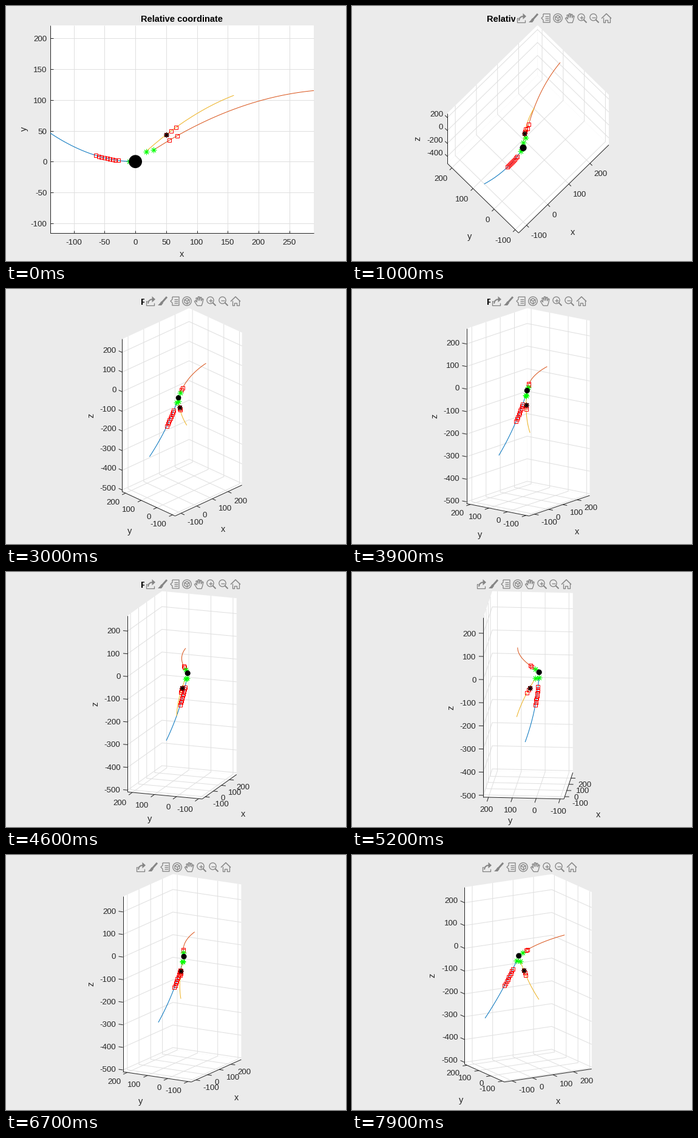
Write a matplotlib script that moves like this. It is 560x420 px and loops after 8 s.

```python
import numpy as np
import matplotlib.pyplot as plt
from matplotlib.animation import FuncAnimation
from matplotlib.patches import Circle, Polygon, Rectangle

W, H, PT = 560, 420, 0.72            # stage size, points per pixel
FRAMES, STEP = 80, 2.5               # degrees turned per frame
BG, INK, GRID, ICON = "#ebebeb", "#262626", "#dfdfdf", "#858585"
LO = np.array([-137.8, -116.0, -508.0])
HI = np.array([289.4, 221.6, 268.0])
MID = (LO + HI) / 2
CENTER = np.array([290.0, 202.7])
AREA = (434.0, 342.3)

plt.rcParams["font.family"] = "Liberation Sans"
fig = plt.figure(figsize=(W / 100, H / 100), dpi=100, facecolor=BG)
ax = fig.add_axes([0, 0, 1, 1])


# ---- flight paths: y and z as functions of x ----
def blue(x):
    return np.array([x, 0.00242 * x**2, 1.93 * x - 0.6 + 0.0001 * x**2])


def orange(x):
    u = x - 29.5
    return np.array([x, 18.7 + 0.6459 * u - 0.001056 * u**2, 4 + 0.0745 * x])


def yellow(x):
    u = x - 17.2
    return np.array([x, 16.3 + 0.8919 * u - 0.00177 * u**2,
                     -30 - 1.612 * u + 0.00111 * u**2])


PATHS = [
    (blue, -10, LO[0], "#0072bd", np.linspace(-64, -28, 9)),
    (orange, 29.5, HI[0], "#d95319", np.array([55.0, 68.0])),
    (yellow, 17.2, 159.5, "#edb120", np.array([50.2, 57.6, 66.4])),
]


# ---- camera ----
def view(k):
    if k < 5:
        return 0.0, 90.0
    if k <= 35:
        return -45.0, 90 - STEP * (k - 5)
    if k <= 54:
        return -45 - STEP * (k - 36), 15.0
    return -90 + STEP * (k - 55), 15.0


class Camera:
    def __init__(self, az, el):
        a, e = np.radians([az, el])
        self.m = np.array([
            [np.cos(a), np.sin(a), 0],
            [-np.sin(e) * np.sin(a), np.sin(e) * np.cos(a), np.cos(e)]])
        span = np.abs(self.m) @ (HI - LO)
        self.s = min(AREA[0] / span[0], AREA[1] / span[1])

    def __call__(self, p):
        q = self.s * (self.m @ (np.asarray(p, float).T - MID).T)
        return CENTER + q * [1, -1]

    def curve(self, pts):
        q = self.s * (self.m @ (pts - MID[:, None]))
        return CENTER[0] + q[0], CENTER[1] - q[1]

    def axis(self, i):
        return self.s * self.m[:, i] * [1, -1]


# ---- drawing helpers ----
def line(*pts, color=INK, lw=1.0, z=2):
    x, y = zip(*pts)
    ax.plot(x, y, color=color, lw=lw * PT, zorder=z, solid_capstyle="butt")


def label(x, y, s, size=13.33, ha="center", z=6, **kw):
    ax.text(x, y, s, fontsize=size * PT, ha=ha, va="center_baseline"
            if kw.get("rotation") is None else "center",
            color=kw.pop("color", INK), zorder=z, **kw)


def ticks(i, step):
    return np.arange(np.ceil(LO[i] / step), HI[i] // step + 1) * step


def at(i, v, base):
    p = np.array(base, float)
    p[i] = v
    return p


# ---- plot frames ----
def flat_axes(cam):
    a, b = cam(LO), cam(HI)
    ax.add_patch(Rectangle(a, *(b - a), color="white", lw=0, zorder=0))
    for v in ticks(0, 50):
        x = cam(at(0, v, LO))[0]
        line((x, a[1]), (x, b[1]), color=GRID, z=1)
        line((x, a[1]), (x, a[1] - 4.3))
        label(x, 388.5, f"{v:.0f}")
    for v in ticks(1, 50):
        y = cam(at(1, v, LO))[1]
        line((a[0], y), (b[0], y), color=GRID, z=1)
        line((a[0], y), (a[0] + 4.3, y))
        label(67.5, y + 0.5, f"{v:.0f}", ha="right")
    line((a[0], b[1]), a, (b[0], a[1]))
    label(290, 407.5, "x", 14.67)
    label(30, 202, "y", 14.67, rotation=90)


def offsets(az, el):
    """Shift of the x, y and z names from the middle of their axes."""
    if el > 15:
        els = [15, 50, 77.5, 90]
        cols = ([25, 22, 15, 12], [41.5, 54, 70, 77],
                [-32, -29, -22, -20], [41, 50, 62, 67], [-53, -48, -49, -49])
        v = [np.interp(el, els, c) for c in cols]
    else:
        azs = [-90, -85, -60, -52.5, -30]
        cols = ([52, 49, 33, 29, 17], [46.5, 46, 43, 42, 41],
                [-20, -22, -27, -29, -38], [35.5, 36, 39, 40, 43])
        v = [np.interp(az, azs, c) for c in cols] + [-52.5]
    return (v[0], v[1]), (v[2], v[3]), (v[4], 0)


def box_axes(cam, az, el):
    x0, y0, z0 = LO
    x1, y1, z1 = HI
    faces = [
        [(x0, y0, z0), (x1, y0, z0), (x1, y1, z0), (x0, y1, z0)],
        [(x1, y0, z0), (x1, y1, z0), (x1, y1, z1), (x1, y0, z1)],
        [(x0, y1, z0), (x1, y1, z0), (x1, y1, z1), (x0, y1, z1)]]
    for f in faces:
        ax.add_patch(Polygon([cam(p) for p in f], color="white", lw=0, zorder=0))

    unit = [np.hypot(*cam.axis(i)) for i in range(3)]
    tick = 0.025 * max(unit * (HI - LO))
    steps = [50 if 50 * u > 28 else 100 for u in unit[:2]]
    steps.append(next((s for s, gap in ((100, 28), (200, 18), (500, 12))
                       if s * unit[2] > gap), 0))
    bases = [(0, y0, z0), (x0, 0, z0), (x0, y1, 0)]
    # grid bends: the three points each grid line runs through
    bends = [[(0, y0, z0), (0, y1, z0), (0, y1, z1)],
             [(x0, 0, z0), (x1, 0, z0), (x1, 0, z1)],
             [(x0, y1, 0), (x1, y1, 0), (x1, y0, 0)]]
    ways = [-cam.axis(1), -cam.axis(0), cam.axis(1)]
    names = offsets(az, el)

    for i in range(3):
        if i == 2 and el == 90:
            continue
        d = ways[i] / np.hypot(*ways[i])
        for v in ticks(i, steps[i]) if steps[i] else []:
            line(*[cam(at(i, v, p)) for p in bends[i]], color=GRID, z=1)
            p = cam(at(i, v, bases[i]))
            line(p, p + d * tick)
            q = p + d * (tick + 4.5)
            ha = "right" if d[0] < 0 else "left"
            if i == 1 and abs(d[0]) < 0.5:
                ha, q = "center", p + d * (tick + 3)
            label(q[0], q[1] + (0.5 if i == 2 else 10), f"{v:.0f}", ha=ha)
        a, b = cam(at(i, LO[i], bases[i])), cam(at(i, HI[i], bases[i]))
        line(a, b)
        m = (a + b) / 2 + names[i]
        label(m[0], m[1], "xyz"[i], 14.67, rotation=90 if i == 2 else None)


def flight(cam):
    def marks(pts, marker, size, color, lw, z):
        x, y = cam.curve(pts)
        ax.plot(x, y, ls="", marker=marker, ms=size * PT, mfc="none",
                mec=color, mew=lw * PT, zorder=z)

    for f, start, end, color, spots in PATHS:
        x, y = cam.curve(f(np.linspace(start, end, 90)))
        ax.plot(x, y, color=color, lw=1.0 * PT, zorder=3)
        marks(f(spots), "s", 6.2, "#ff0000", 1.0, 4)
        marks(f(np.array([float(start)])), (8, 2, 0), 9.5, "#00ff00", 1.0, 4)
    marks(yellow(np.array([50.2])), (8, 2, 0), 8.5, "black", 1.1, 5)
    ax.add_patch(Circle(cam((0, 0, 0)), 10 * cam.s + 0.7, color="black",
                        lw=0, zorder=5))


# ---- toolbar ----
def toolbar_left(k):
    left = None
    for start, x in ((9, 271), (20, 235), (27, 230), (52, 205), (60, 214)):
        if k >= start:
            left = x
    return left


def toolbar(left):
    ax.add_patch(Rectangle((left - 2, 9), 160, 21, color=BG, lw=0, zorder=8))
    cx = [left + 8 + 20 * i for i in range(8)]
    cy = 20

    def stroke(i, *pts, lw=1.3):
        line(*[(cx[i] + x, cy + y) for x, y in pts], color=ICON, lw=lw, z=9)

    def shape(i, *pts):
        ax.add_patch(Polygon([(cx[i] + x, cy + y) for x, y in pts],
                             color=ICON, lw=0, zorder=9))

    def ring(i, x, y, r):
        ax.add_patch(Circle((cx[i] + x, cy + y), r, fill=False, ec=ICON,
                            lw=1.3 * PT, zorder=9))

    # export
    stroke(0, (-5, 0), (-7, 0), (-7, 7), (6, 7), (6, 3))
    stroke(0, (-4, 4), (-3, 0), (0, -2.5), (4, -3), lw=2)
    shape(0, (2.5, -8), (8, -3), (2.5, 2))
    # brush
    stroke(1, (7, -7), (-1, 2), lw=3)
    shape(1, (-2, 0), (1, 3), (-2, 7), (-8, 7), (-5, 4))
    # data tip
    stroke(2, (-4, -7), (7, -7), (7, 7), (-4, 7), (-4, 3), (-7, 0), (-4, -3),
           (-4, -7))
    for y in (-3, 0, 3):
        stroke(2, (-1, y), (5, y))
    # rotate
    ring(3, 0, 0, 7.2)
    stroke(3, (0, -4.5), (4, -2.3), (4, 2.3), (0, 4.5), (-4, 2.3), (-4, -2.3),
           (0, -4.5))
    stroke(3, (-4, -2.3), (0, 0), (4, -2.3))
    stroke(3, (0, 0), (0, 4.5))
    # hand
    stroke(4, (-3, 7.5), (-7.5, 0.5), (-6, -1), (-3.5, 1.5), (-5, -5),
           (-3.2, -5.5), (-1.5, -1), (-1.5, -7.3), (0.5, -7.3), (1, -1),
           (2.2, -6.5), (4, -6), (3.8, -0.5), (5.5, -4), (7, -3.3),
           (5.5, 3.5), (4, 7.5), (-3, 7.5))
    # zoom in, zoom out
    for i in (5, 6):
        ring(i, -1.5, -1.5, 5.6)
        stroke(i, (2.5, 2.5), (7.5, 7.5), lw=2)
        stroke(i, (-4.5, -1.5), (1.5, -1.5))
    stroke(5, (-1.5, -4.5), (-1.5, 1.5))
    # home
    stroke(7, (-8, 0.5), (0, -7.3), (8, 0.5), lw=1.5)
    stroke(7, (-5.5, -1), (-5.5, 7.3), (-1.7, 7.3), (-1.7, 2.5), (1.7, 2.5),
           (1.7, 7.3), (5.5, 7.3), (5.5, -1))


def draw(k):
    ax.clear()
    ax.set_xlim(0, W)
    ax.set_ylim(H, 0)
    ax.axis("off")
    az, el = view(k)
    cam = Camera(az, el)
    if az == 0:
        flat_axes(cam)
    else:
        box_axes(cam, az, el)
    flight(cam)
    label(289.5, 20, "Relative coordinate", 14.67, weight="bold",
          color="black", z=7)
    left = toolbar_left(k)
    if left is not None:
        toolbar(left)
    return []


anim = FuncAnimation(fig, draw, frames=FRAMES, interval=100,
                     init_func=lambda: [], repeat=True, repeat_delay=0)
plt.show()
```
